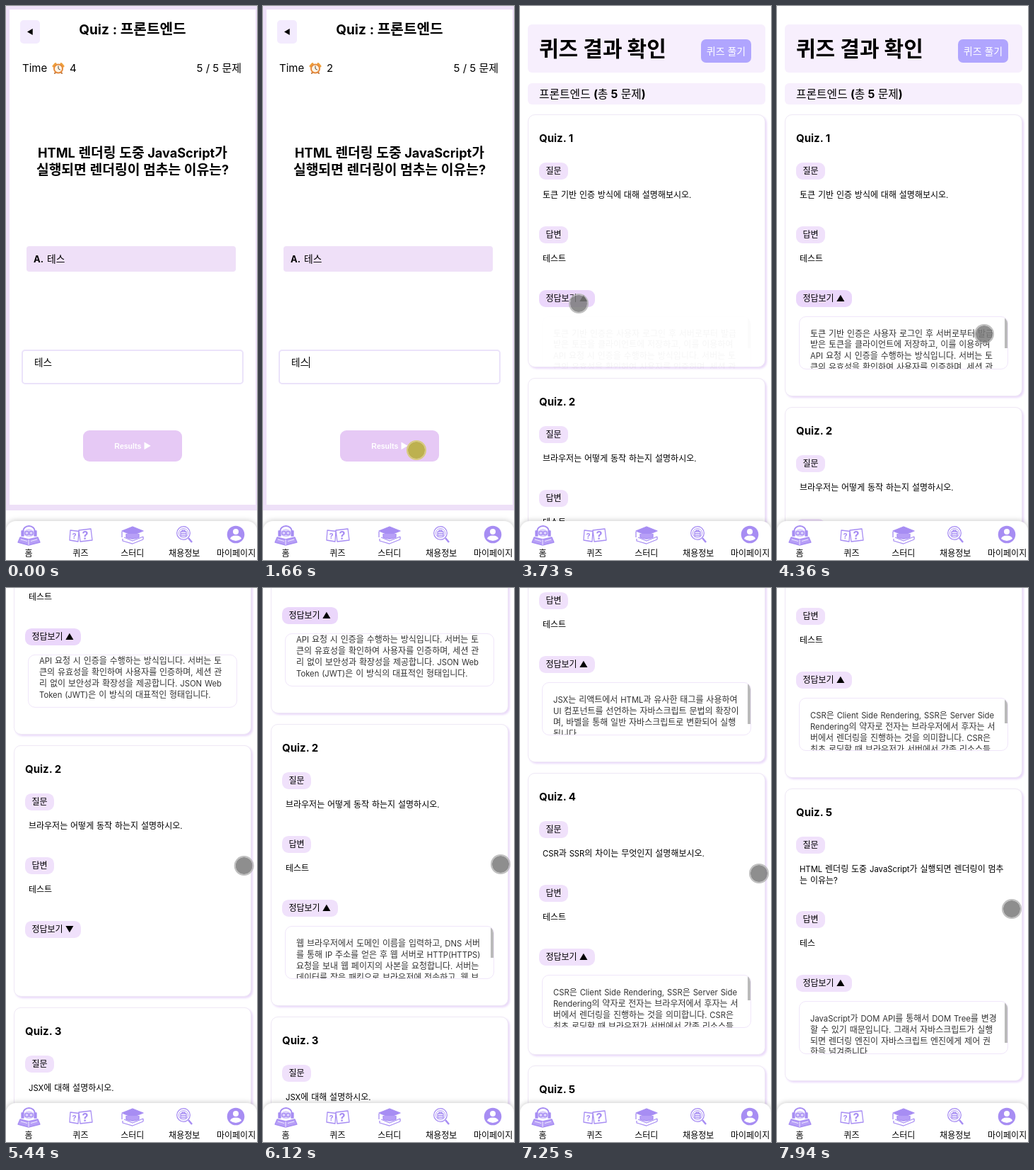
Write an HTML page that moves like this. It is 355 px wide and 782 px high and loops after 8 s.

```html
<!DOCTYPE html>
<html lang="ko">
<head>
<meta charset="utf-8">
<style>
html, body { margin: 0; width: 100%; height: 100%; overflow: hidden; background: #fff }
body { position: relative; font: 12px/16px Inter, "Noto Sans CJK KR", "Noto Sans CJK", sans-serif; color: #000; white-space: pre }
div, svg { position: absolute; box-sizing: border-box }
i { font-style: normal; font-size: .94em }
#quiz, #results { inset: 0 }
.frame { left: 0; top: 0; width: 355px; height: 712px; border: 5px solid #eee0f8; border-right-width: 2px; border-bottom-width: 8px }
.back { left: 20px; top: 20px; width: 28px; height: 33px; border-radius: 5px; background: #f3ebfe; font-size: 10px; line-height: 33px; text-align: center }
.mid { left: 0; width: 358px; text-align: center; font-size: 19.3px; line-height: 23.5px; font-weight: 700 }
.info { top: 78px; font-size: 15px; line-height: 20px }
.mine { left: 29px; top: 339px; width: 296px; height: 36px; border-radius: 4px; background: #efe0f8 }
.mine div { top: 10px; font-size: 13px }
.field { left: 22px; top: 485px; width: 314px; height: 49px; border: 2px solid #ebe3fa; border-radius: 5px; padding: 8px 16px; font-size: 13.6px }
#caret { left: 65px; top: 495px; width: 1px; height: 16px; background: #000 }
.go { left: 109px; top: 599px; width: 140px; height: 44px; border-radius: 9px; background: #e6c9f5; color: #fff; font: bold 10.5px/44px "Liberation Sans", Arial, sans-serif; text-align: center }
.hero, .topic { left: 11px; width: 336px; border-radius: 6px; background: #f7effd }
.hero { top: 26px; height: 68px; padding-left: 16px; font-size: 30px; line-height: 69px; font-weight: 700 }
.again { left: 245px; top: 21px; width: 71px; height: 33px; border-radius: 7px; background: #b0a5fe; color: #fff; font-size: 14px; line-height: 33px; font-weight: 400; text-align: center }
.topic { top: 109px; height: 30px; padding-left: 16px; font-size: 15.8px; line-height: 31px; font-weight: 500 }
#cards { left: 0; top: 0 }
.card { left: 11px; width: 336px; border: 1px solid #eee8f5; border-radius: 10px; background: #fff; box-shadow: 2px 2px 3px #ead9fa }
.card > div { margin: -1px }
.card h2 { position: absolute; left: 15px; top: 23px; margin: 0; font-size: 15px; line-height: 20px }
.pill { left: 16px; height: 24px; padding: 0 9.5px; border-radius: 9px; background: #f0e1fb; line-height: 24px; font-weight: 500 }
.card:first-child .more.on { background: #ebd7fb }
.line { left: 21px; font-size: 12px; line-height: 15px; word-spacing: .5px }
.answer { left: 20px; width: 296px; height: 75px; border: 1px solid #f0e6fa; border-radius: 10px; overflow: hidden; color: #333 }
.text { left: 15px; top: 15.5px; line-height: 15px; word-spacing: .5px }
.thumb { right: 0; top: 0; width: 4px; background: #bababa }
#nav { left: 0; top: 727px; width: 355px; height: 70px; border-radius: 14px 14px 0 0; background: #fff; box-shadow: 0 -1px 7px #0003 }
#nav div { top: 38px; width: 74px; text-align: center; font-size: 12px }
#nav svg { left: 0; top: 0 }
#dot { left: -14px; top: -14px; width: 28px; height: 28px; border-radius: 50%; border: 2.5px solid #b4b4b4d9; background: #7b7b7bd9; background-clip: padding-box }
#dot.press { border-color: #d6cb70e6; background-color: #b8ae3ee6 }
</style>
</head>
<body>
<div id="quiz">
  <div class="frame"></div>
  <div class="back">◀</div>
  <div class="mid" style="top:21px;font-size:20.2px">Quiz : 프론트엔드</div>
  <div class="info" style="left:23px">Time</div>
  <svg style="left:65px;top:79px" width="18" height="18" fill="none" stroke-linecap="round">
    <path d="M2 6 5 2.5M16 6 13 2.5" stroke="#efa13c" stroke-width="3"/>
    <path d="M4 16 5.5 14M14 16 12.5 14" stroke="#b46d35" stroke-width="2"/>
    <circle cx="9" cy="9.5" r="6" fill="#fff4e4" stroke="#e58a3c" stroke-width="2"/>
    <path d="M9 6V9.5L11.5 11" stroke="#444"/>
  </svg>
  <div class="info" id="count" style="left:90px"></div>
  <div class="info" style="right:22px">5 / 5 문제</div>
  <div class="mid" style="top:196px">HTML 렌더링 도중 JavaScript가
실행되면 렌더링이 멈추는 이유는?</div>
  <div class="mine"><div style="left:10px;font-weight:700">A.</div><div style="left:29px;font-size:13.8px">테스</div></div>
  <div class="field">테스</div>
  <div id="caret"></div>
  <div class="go">Results ▶</div>
</div>
<div id="results">
  <div class="hero">퀴즈 결과 확인<div class="again">퀴즈 풀기</div></div>
  <div class="topic">프론트엔드 <b>(</b>총 <b>5</b> 문제<b>)</b></div>
  <div id="cards"></div>
</div>
<div id="nav">
  <svg width="355" height="40" fill="none" stroke="#a78df3" stroke-width="1.3" stroke-linejoin="round">
    <g>
      <path d="M24 18V15a8.5 8 0 0 1 17 0v3" stroke-width="2"/>
      <path d="M26 14q6-6 13 0v6q-6 5-13 0z" fill="#ddd2fc" stroke="none"/>
      <path d="M22 14h3v7h-3zM40 14h3v7h-3z" fill="#a78df3"/>
      <circle cx="29.5" cy="17" r="2.7"/><circle cx="35.5" cy="17" r="2.7"/>
      <path d="M20 23 32 26 45 23 48 30 32 34 17 30z" fill="#b79ff7"/>
      <path d="M32 26v8M21 26l9 2.5M44 26l-9 2.5" stroke="#fff" stroke-width=".8"/>
    </g>
    <g>
      <path d="M91 13 103 14.5 102 29 90 27zM103 13 120 11 122 27 105 29z"/>
      <g fill="#a78df3" stroke="none" font-weight="700"><text x="93.5" y="25" font-size="11">?</text><text x="107.5" y="26" font-size="16">?</text></g>
    </g>
    <g>
      <path d="M164 14 179 8 194 14 179 20z" fill="#a78df3"/>
      <path d="M170 18v5q9 4 18 0v-5" fill="#b79ff7"/>
      <path d="M164 15v8M167 23 179 28 194 22M165 25v3l14 4 15-6M194 22v4"/>
    </g>
    <g>
      <circle cx="251" cy="17" r="9.3"/><circle cx="251" cy="17" r="6.6" stroke-width=".8"/>
      <path d="M247 15h8v6h-8zM249 15v-2h4v2M247 18h8"/>
      <path d="M258 24 263 30" stroke-width="2.5"/>
    </g>
    <g stroke="none">
      <circle cx="325" cy="19" r="12.3" fill="#a78df3"/>
      <circle cx="325" cy="15" r="4" fill="#fff"/>
      <path d="M317 25q1-4.5 8-4.5t8 4.5q-8 6-16 0z" fill="#fff"/>
    </g>
  </svg>
</div>
<div id="dot"></div>
<script>
const $ = id => document.getElementById(id);
const LOOP = 8000, SWITCH = 1870, VIEW = 73;

const quizzes = [
  { ask: '토큰 기반 인증 방식에 대해 설명해보시오.', open: [3700, 3950],
    text: `토큰 기반 인증은 사용자 로그인 후 서버로부터 발급
받은 토큰을 클라이언트에 저장하고, 이를 이용하여
API 요청 시 인증을 수행하는 방식입니다. 서버는 토
큰의 유효성을 확인하여 사용자를 인증하며, 세션 관
리 없이 보안성과 확장성을 제공합니다. JSON Web
Token (JWT)은 이 방식의 대표적인 형태입니다.` },
  { ask: '브라우저는 어떻게 동작 하는지 설명하시오.', open: [5760, 5920],
    text: `웹 브라우저에서 도메인 이름을 입력하고, DNS 서버
를 통해 IP 주소를 얻은 후 웹 서버로 HTTP(HTTPS)
요청을 보내 웹 페이지의 사본을 요청합니다. 서버는
데이터를 작은 패킷으로 브라우저에 전송하고, 웹 브
라우저는 이를 조립하여
화면에 표시합니다.` },
  { ask: 'JSX에 대해 설명하시오.', open: [6400, 6450],
    text: `JSX는 리액트에서 HTML과 유사한 태그를 사용하여
UI 컴포넌트를 선언하는 자바스크립트 문법의 확장이
며, 바벨을 통해 일반 자바스크립트로 변환되어 실행
됩니다.` },
  { ask: 'CSR과 SSR의 차이는 무엇인지 설명해보시오.', open: [6850, 6920],
    text: `CSR은 Client Side Rendering, SSR은 Server Side
Rendering의 약자로 전자는 브라우저에서 후자는 서
버에서 렌더링을 진행하는 것을 의미합니다. CSR은
최초 로딩할 때 브라우저가 서버에서 각종 리소스들\n\n\n\n` },
  { ask: 'HTML 렌더링 도중 JavaScript가 실행되면 렌더링이 멈추\n는 이유는?', reply: '테스', open: [7680, 7800],
    text: `JavaScript가 DOM API를 통해서 DOM Tree를 변경
할 수 있기 때문입니다. 그래서 자바스크립트가 실행
되면 렌더링 엔진이 자바스크립트 엔진에게 제어 권
한을 넘겨줍니다.` }
];

// Keyframes: time, then values
const scrollKeys = [[5160, 0], [5500, 374], [6120, 374], [6290, 760], [6710, 760], [6850, 1131],
  [7250, 1131], [7500, 1478], [7760, 1478], [7900, 1522]];
const innerKeys = [[4690, 0], [5020, 47]];
const dotKeys = [[130, 305, 762], [870, 217, 627], [2190, 217, 627], [2330, 231, 641], [2800, 83, 434],
  [2940, 83, 434], [3200, 83, 420], [3900, 83, 420], [4300, 293, 463], [5160, 293, 463],
  [5300, 339, 400], [5500, 336, 390], [5680, 66, 452], [5800, 66, 452], [6080, 336, 390],
  [6290, 336, 390], [6390, 66, 479], [6710, 66, 479], [6840, 66, 521], [6880, 66, 521],
  [6920, 338, 403], [7450, 338, 403], [7620, 66, 602], [7720, 66, 602], [7900, 332, 453]];
const presses = [[1660, 1800], [3560, 3700], [5720, 5800], [6390, 6450], [6840, 6880], [7640, 7720]];

function at(keys, t) {
  const i = keys.findIndex(k => k[0] > t);
  if (i < 0) return keys.at(-1).slice(1);
  if (!i) return keys[0].slice(1);
  const [a, b] = [keys[i - 1], keys[i]];
  const p = (t - a[0]) / (b[0] - a[0]), e = p * p * (3 - 2 * p);
  return a.slice(1).map((v, j) => v + (b[j + 1] - v) * e);
}

function add(parent, cls, top, text = '') {
  const el = document.createElement('div');
  el.className = cls;
  if (top !== null) el.style.top = top + 'px';
  el.textContent = text;
  return parent.appendChild(el);
}

quizzes.forEach((q, i) => {
  q.extra = q.ask.includes('\n') ? 15 : 0;
  q.card = add($('cards'), 'card', null);
  q.card.innerHTML = `<h2>Quiz. ${i + 1}</h2>`;
  add(q.card, 'pill', 68, '질문');
  add(q.card, 'line', 106, q.ask);
  add(q.card, 'pill', 158 + q.extra, '답변');
  add(q.card, 'line', 196 + q.extra, q.reply || '테스트');
  q.more = add(q.card, 'pill more', 248 + q.extra);
  q.answer = add(q.card, 'answer', 285 + q.extra);
  q.body = add(q.answer, 'text', null, q.text);
  q.thumb = add(q.answer, 'thumb', null);
  q.full = 32 + 15 * q.text.split('\n').length;
  q.thumb.style.height = VIEW * VIEW / q.full + 'px';
});

// Latin runs are set a little smaller than Hangul
document.querySelectorAll('.mid, .line, .text').forEach(el =>
  el.innerHTML = el.textContent.replace(/[!-~]+/g, '<i>$&</i>'));

['홈', '퀴즈', '스터디', '채용정보', '마이페이지'].forEach((name, i) =>
  add($('nav'), '', null, name).style.left = -5 + 73.4 * i + 'px');

function draw(now) {
  const t = now % LOOP, show = (el, on) => el.style.display = on ? '' : 'none';
  show($('quiz'), t < SWITCH);
  show($('results'), t >= SWITCH);
  show($('caret'), t >= 1660);
  $('count').textContent = t < 200 ? 4 : t < 1200 ? 3 : 2;

  let top = 153;
  quizzes.forEach((q, i) => {
    const [a, b] = q.open, open = at([[a, 0], [b, 1]], t)[0];
    const height = 355 + q.extra + 43 * open;
    q.card.style.top = top + 'px';
    q.card.style.height = height + 'px';
    q.answer.style.opacity = open;
    q.more.textContent = '정답보기 ' + (open ? '▲' : '▼');
    q.more.classList.toggle('on', open > 0);
    top += height + 15;
    if (!i) {
      const y = at(innerKeys, t)[0];
      q.body.style.transform = `translateY(${-y}px)`;
      q.thumb.style.transform = `translateY(${y * VIEW / q.full}px)`;
      show(q.thumb, t < 5160);
    }
  });
  $('results').style.transform = `translateY(${-at(scrollKeys, t)[0]}px)`;

  const [x, y] = at(dotKeys, t);
  show($('dot'), t >= 130);
  $('dot').style.transform = `translate(${x}px, ${y}px)`;
  $('dot').classList.toggle('press', presses.some(([a, b]) => t >= a && t < b));
}

const start = performance.now();
(function tick() {
  draw(performance.now() - start);
  requestAnimationFrame(tick);
})();
</script>
</body>
</html>
```
